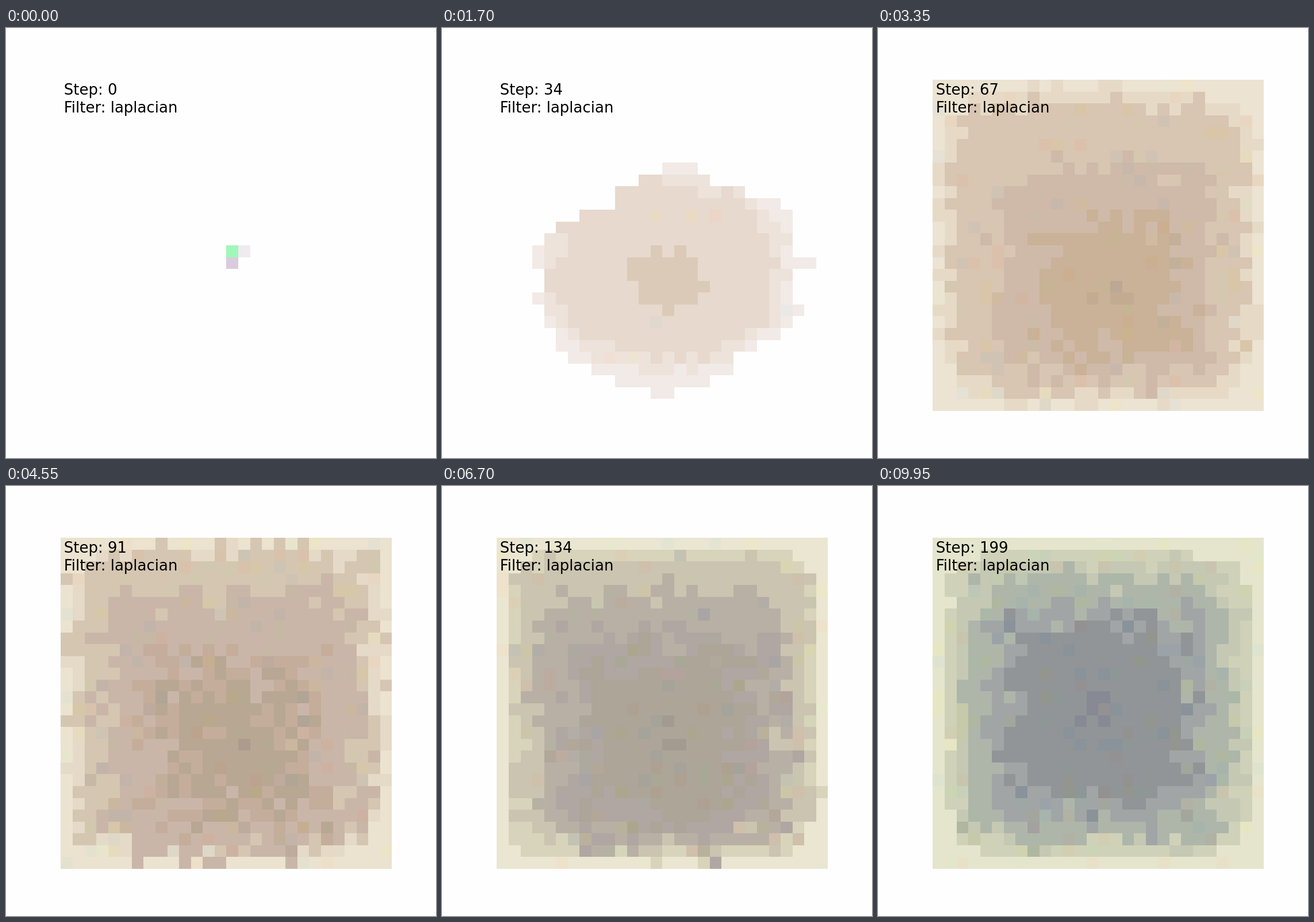
Recreate the animation shown at these times as an HTML page with a canvas. Size 748 by 748 pixels, loop 10 s.

```html
<!DOCTYPE html>
<html>
<head>
<meta charset="utf-8">
<style>
html, body { margin: 0; height: 100%; overflow: hidden; background: #fefefe; }
canvas { display: block; }
</style>
</head>
<body>
<canvas id="stage" width="748" height="748"></canvas>
<script>
const ctx = document.getElementById('stage').getContext('2d');
const N = 28, SIZE = 20.57, LEFT = 95.4, TOP = 90, STEPS = 200, STEP_MS = 50;

// Each state: centre of the outer and inner rings, aspect, roundness, grain
// strength, radii of tone 2 upward, and the tones from rim to core.
const states = [
  { step: 0, outer: [14, 14.5], inner: [14, 14.5], aspect: 1.2, power: 2, rough: 1,
    radii: [-3, -3, -3, -3, -3, -3],
    tones: 'f2ebe9 eee3de e8dad0 e4d5ca dfcfc3 dacabd d5c4b6' },
  { step: 23, outer: [13.8, 16], inner: [13.8, 16], aspect: 1.4, power: 2, rough: 1,
    radii: [7, 5.4, -3, -3, -3, -3],
    tones: 'f2eae7 ede2db e8dacf e0cfc0 d9c6b3 d4baa9 cdb6a4' },
  { step: 44, outer: [13.5, 15.4], inner: [14.2, 17], aspect: 1.13, power: 2.5, rough: 1,
    radii: [13.5, 12.8, 8.2, 0.6, -3, -3],
    tones: 'f2eae6 ede3db e6d9cc d9c6b3 d4baa9 d0b8a6 cab2a0' },
  { step: 67, outer: [13.5, 13.5], inner: [14.8, 17.3], aspect: 1, power: 5, rough: 1.4,
    radii: [13.4, 12.4, 9, 5.6, 0, -2],
    tones: 'ece3d2 e6dac7 d8c5b2 cfbaa9 c9b297 c3ab92 bba996' },
  { step: 91, outer: [13.5, 13.5], inner: [14.2, 16.8], aspect: 1, power: 6, rough: 2,
    radii: [13.4, 12.8, 11, 6.6, 4.4, -3],
    tones: 'ebe3cf e5dac7 d5c6b2 cab6a8 c5ad9b b8a793 ad9b8e' },
  { step: 134, outer: [13.5, 13.5], inner: [14, 16], aspect: 1, power: 7, rough: 1.6,
    radii: [13.2, 12.4, 10.6, 8.4, 6.2, -1],
    tones: 'ebe6d1 d8d4bb cbc4b1 b9b0a5 b0a7a2 aca598 a39b90' },
  { step: 199, outer: [13.5, 13.5], inner: [13.4, 14.4], aspect: 1, power: 6, rough: 1.2,
    radii: [13, 12, 11.1, 8.8, 7, 0.2],
    tones: 'e5e5cd cfd2b8 c5c8b3 aeb6aa a2a5a6 919598 878a94' }
];
for (const s of states) s.tones = s.tones.split(' ').map(rgb);

// Column spans of the growing patch, row by row from the first filled row.
const outlines = [
  { first: 14, spans: [[14, 16], [14, 15]] },
  { first: 10, spans: [[18, 19], [13, 20], [10, 20], [8, 20], [6, 21], [7, 23], [6, 22],
    [7, 22], [7, 20], [6, 22], [8, 20], [10, 19], [9, 16], [12, 13]] },
  { first: 1, spans: [[13, 15], [10, 17], [10, 24], [10, 23], [7, 24], [5, 25], [5, 27],
    [3, 26], [2, 28], [2, 27], ...Array(12).fill([0, N]),
    [0, 27], [0, 27], [0, 26], [2, 24], [3, 23]] },
  { first: 0, spans: Array(N).fill([0, N]) }
];

const seeds = [[14, 14, 'a0f8b8'], [15, 14, 'efebf1'], [14, 15, 'd9ccdd']];
const tints = [[3, -4, -6], [-7, -2, 2], [1, 1, -9], [-3, 2, -2]];

function rgb(hex) { return [0, 2, 4].map(i => parseInt(hex.substr(i, 2), 16)); }
function lerp(a, b, u) { return a + (b - a) * u; }
function mix(a, b, u) { return a.map((v, i) => lerp(v, b[i], u)); }
function hash(x, y, z) {
  const v = Math.sin(x * 127.1 + y * 311.7 + z * 74.7) * 43758.5453;
  return v - Math.floor(v);
}

// Slowly changing grain with a broad ripple, about -1 to 1.
function grain(x, y, step) {
  const t = step / 30, k = Math.floor(t);
  const fine = lerp(hash(x, y, k), hash(x, y, k + 1), t - k) * 2 - 1;
  return fine * 0.8 + 0.3 * Math.sin(x * 0.9 + y * 0.4) * Math.cos(y * 0.8 - x * 0.3);
}

// Unfilled rows have a closed span that opens later the farther they lie.
function spanAt(outline, y) {
  const row = y - outline.first, last = outline.spans.length - 1;
  if (row >= 0 && row <= last) return outline.spans[row];
  const away = row < 0 ? -row : row - last;
  return [14 + 3 * away, 14 - 3 * away];
}

function isFilled(x, y, i, u) {
  if (i > 2) return true;
  const [l, r] = mix(spanAt(outlines[i], y), spanAt(outlines[i + 1], y), u);
  const ragged = 1.6 * Math.sin(Math.PI * u);
  return x >= l + ragged * (hash(x, y, 5) - 0.5) && x < r + ragged * (hash(x, y, 6) - 0.5);
}

function stateAt(step) {
  let i = states.length - 2;
  while (states[i].step > step) i--;
  const a = states[i], b = states[i + 1], u = (step - a.step) / (b.step - a.step);
  return {
    i, u,
    outer: mix(a.outer, b.outer, u),
    inner: mix(a.inner, b.inner, u),
    aspect: lerp(a.aspect, b.aspect, u),
    power: lerp(a.power, b.power, u),
    rough: lerp(a.rough, b.rough, u),
    radii: mix(a.radii, b.radii, u),
    tones: a.tones.map((c, k) => mix(c, b.tones[k], u))
  };
}

function toneIndex(x, y, s, n) {
  let tone = 0;
  s.radii.forEach((radius, k) => {
    const [cx, cy] = mix(s.outer, s.inner, Math.min(1, Math.max(0, (k - 1) / 2)));
    const dx = Math.abs(x - cx), dy = Math.abs(y - cy) * s.aspect;
    const r = (dx ** s.power + dy ** s.power) ** (1 / s.power);
    if (r + n * (0.6 + k * 0.45 * s.rough) < radius) tone = k + 1;
  });
  return tone;
}

function fillCell(x, y, color) {
  const px = Math.round(LEFT + x * SIZE), py = Math.round(TOP + y * SIZE);
  ctx.fillStyle = `rgb(${color.map(Math.round)})`;
  ctx.fillRect(px, py, Math.round(LEFT + (x + 1) * SIZE) - px, Math.round(TOP + (y + 1) * SIZE) - py);
}

function draw(step) {
  const s = stateAt(step), tintShare = 0.16 * Math.min(1, Math.max(0, (step - 25) / 50));
  ctx.fillStyle = '#fefefe';
  ctx.fillRect(0, 0, 748, 748);

  for (let y = 0; y < N; y++) for (let x = 0; x < N; x++) {
    if (!isFilled(x, y, s.i, s.u)) continue;
    let color = s.tones[toneIndex(x, y, s, grain(x, y, step))];
    const era = Math.floor(step / 40 + hash(x, y, 11));
    if (hash(x, y, era + 20) < tintShare) {
      const tint = tints[Math.floor(hash(x, y, era + 50) * tints.length)];
      color = color.map((v, k) => v + tint[k]);
    }
    fillCell(x, y, color);
  }
  if (step < 8) {
    for (const [x, y, hex] of seeds) fillCell(x, y, mix(rgb(hex), s.tones[0], step / 8));
  }

  ctx.fillStyle = '#000';
  ctx.font = '26px "DejaVu Sans", sans-serif';
  ctx.fillText('Step: ' + step, 100.7, 116);
  ctx.fillText('Filter: laplacian', 100.7, 147);
}

function frame() {
  draw(Math.floor(performance.now() / STEP_MS) % STEPS);
  requestAnimationFrame(frame);
}
frame();
</script>
</body>
</html>
```
